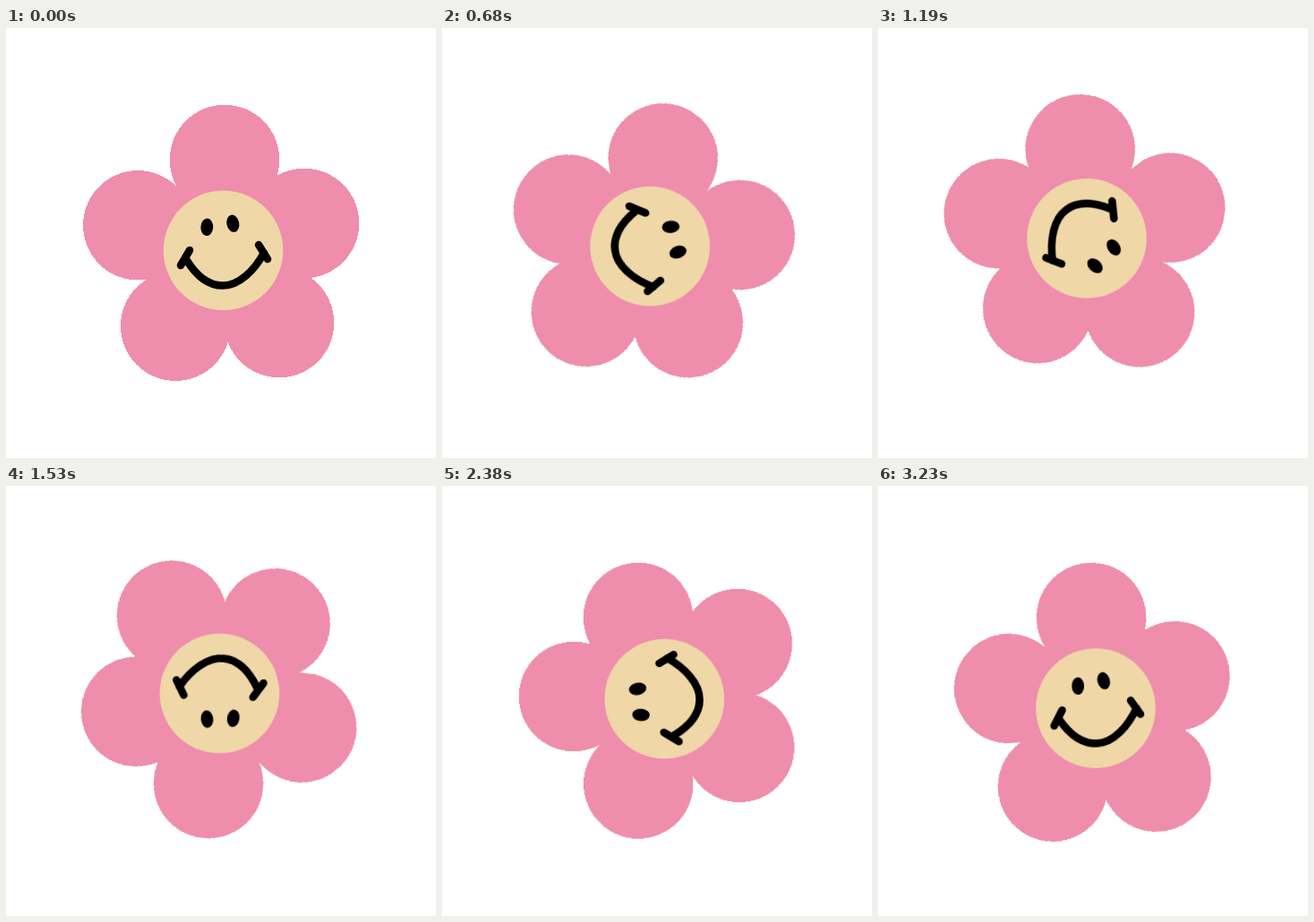
Recreate the animation shown at these times as an HTML page without scripts. Size 480x480 px, loop 3.4 s.

```html
<!DOCTYPE html>
<html lang="en">
<head>
<meta charset="utf-8">
<title>Spinning flower</title>
<style>
  html, body {
    margin: 0;
    width: 100%;
    height: 100%;
    overflow: hidden;
    background: #fff;
  }
  svg {
    display: block;
    width: 100vw;
    height: 100vh;
  }
  /* A tiny head start keeps the steps clear of their exact boundaries. */
  .flower {
    transform-origin: 240px 240px;
    animation: spin 3400ms -8ms step-end infinite;
  }
  .petals { fill: #ef8dad; shape-rendering: crispEdges; }
  .disc { fill: #efd7a8; }
  .mouth {
    fill: none;
    stroke: #000;
    stroke-width: 8.5;
    stroke-linecap: round;
    stroke-linejoin: round;
  }
  /* One pose every 5%: wide steps in the first half, narrower ones after. */
  @keyframes spin {
    0% { transform: rotate(0deg); animation-timing-function: steps(8, end); }
    40% { transform: rotate(164deg); }
    45% { transform: rotate(186.2deg); }
    50% { transform: rotate(202deg); animation-timing-function: steps(9, end); }
    95%, 100% { transform: rotate(356.4deg); }
  }
</style>
</head>
<body>
<svg viewBox="0 0 480 480">
  <g class="flower">
    <g class="petals">
      <path d="M244 147 333 218 305 329 189 333 147 220Z"/>
      <circle cx="244" cy="147" r="61.2"/>
      <circle cx="333" cy="218" r="61.2"/>
      <circle cx="305" cy="329" r="61.2"/>
      <circle cx="189.2" cy="332.7" r="61.2"/>
      <circle cx="147.3" cy="220.3" r="61.2"/>
    </g>
    <circle class="disc" cx="242.5" cy="248.3" r="66.8"/>
    <ellipse cx="224.3" cy="222.3" rx="6.9" ry="9.8" transform="rotate(3 224.3 222.3)"/>
    <ellipse cx="253.3" cy="218.2" rx="6.9" ry="9.7" transform="rotate(-12 253.3 218.2)"/>
    <path class="mouth" d="M201 258C213 278 227 287.6 242 287.6C260 287.6 277 271 288 251M205 248 195 265M282 242 292 258"/>
  </g>
</svg>
</body>
</html>
```
